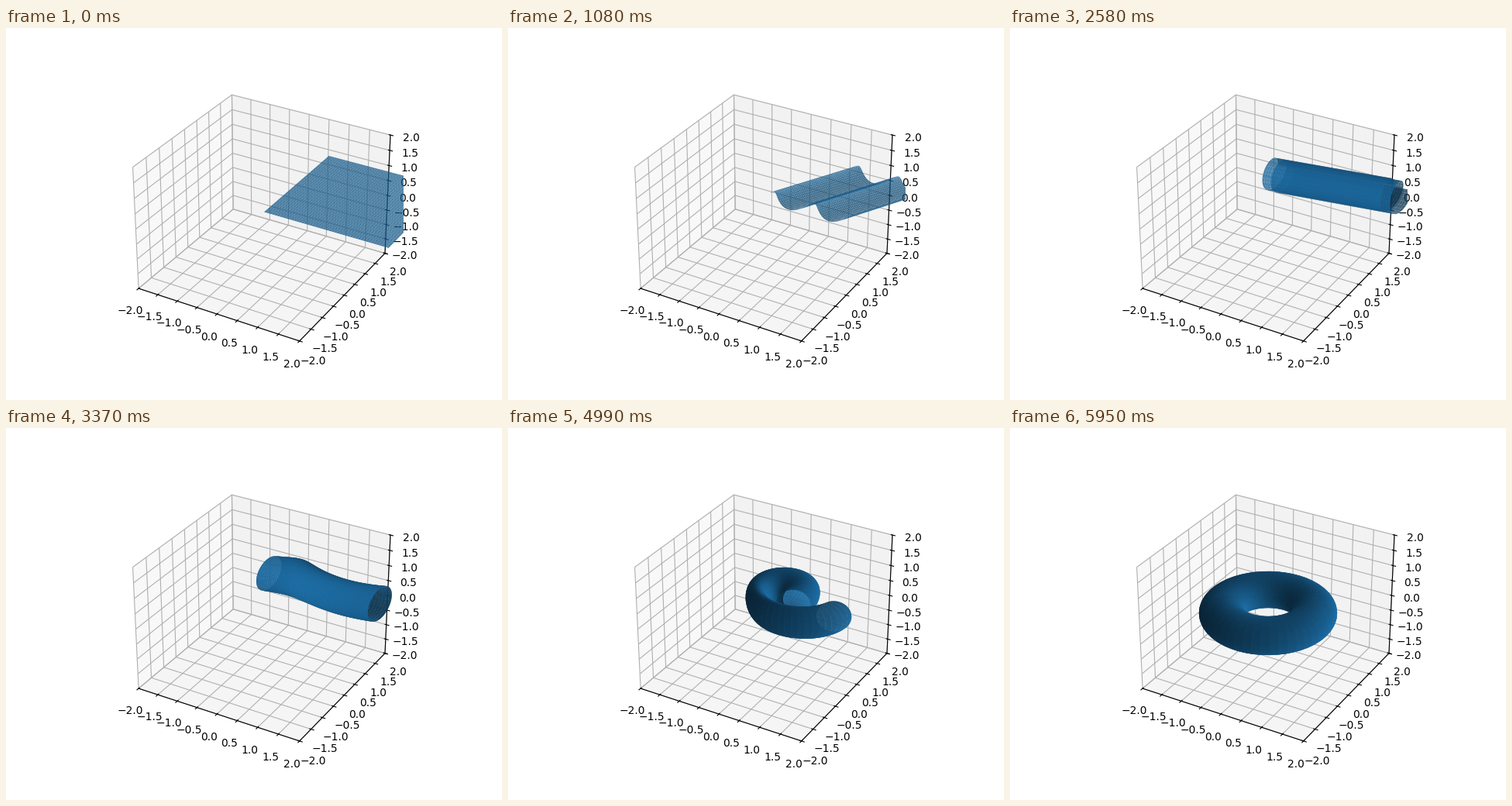
A matplotlib script that plays this animation: 640 px wide and 480 px high, repeating every 6.01 s.

```python
import numpy as np
import matplotlib.pyplot as plt
from matplotlib.animation import FuncAnimation

STEPS = 50          # pictures per stage of the morph
LOOP_MS = 6010
SIZE = 3.0          # side of the flat sheet
R, TUBE = 1.0, 0.5  # torus radii
LIFT = 1.5          # height of the cylinder axis

u, v = np.meshgrid(np.linspace(0, SIZE, 50), np.linspace(0, SIZE, 50))
theta = 4 * np.pi * u / SIZE   # around the tube, wound twice
phi = 2 * np.pi * v / SIZE     # around the ring

ring = R + TUBE * np.cos(theta)
sheet = np.array([u, v, 0 * u])
cylinder = np.array([v, TUBE * np.cos(theta), LIFT + TUBE * np.sin(theta)])
torus = np.array([ring * np.cos(phi), ring * np.sin(phi), TUBE * np.sin(theta)])


def shape(frame):
    stage, step = divmod(frame, STEPS)
    t = step / (STEPS - 1)
    start, end = ((sheet, cylinder), (cylinder, torus))[stage]
    return (1 - t) * start + t * end


fig = plt.figure(figsize=(6.4, 4.8), dpi=100)
ax = fig.add_subplot(projection="3d")
ax.set(xlim=(-2, 2), ylim=(-2, 2), zlim=(-2, 2))
surfaces = []


def update(frame):
    while surfaces:
        surfaces.pop().remove()
    surfaces.append(ax.plot_surface(*shape(frame), color="C0", alpha=0.8))
    ax.set(xlim=(-2, 2), ylim=(-2, 2), zlim=(-2, 2))
    return surfaces


anim = FuncAnimation(fig, update, frames=2 * STEPS, init_func=lambda: surfaces,
                     interval=LOOP_MS / (2 * STEPS), repeat=True)
plt.show()
```
